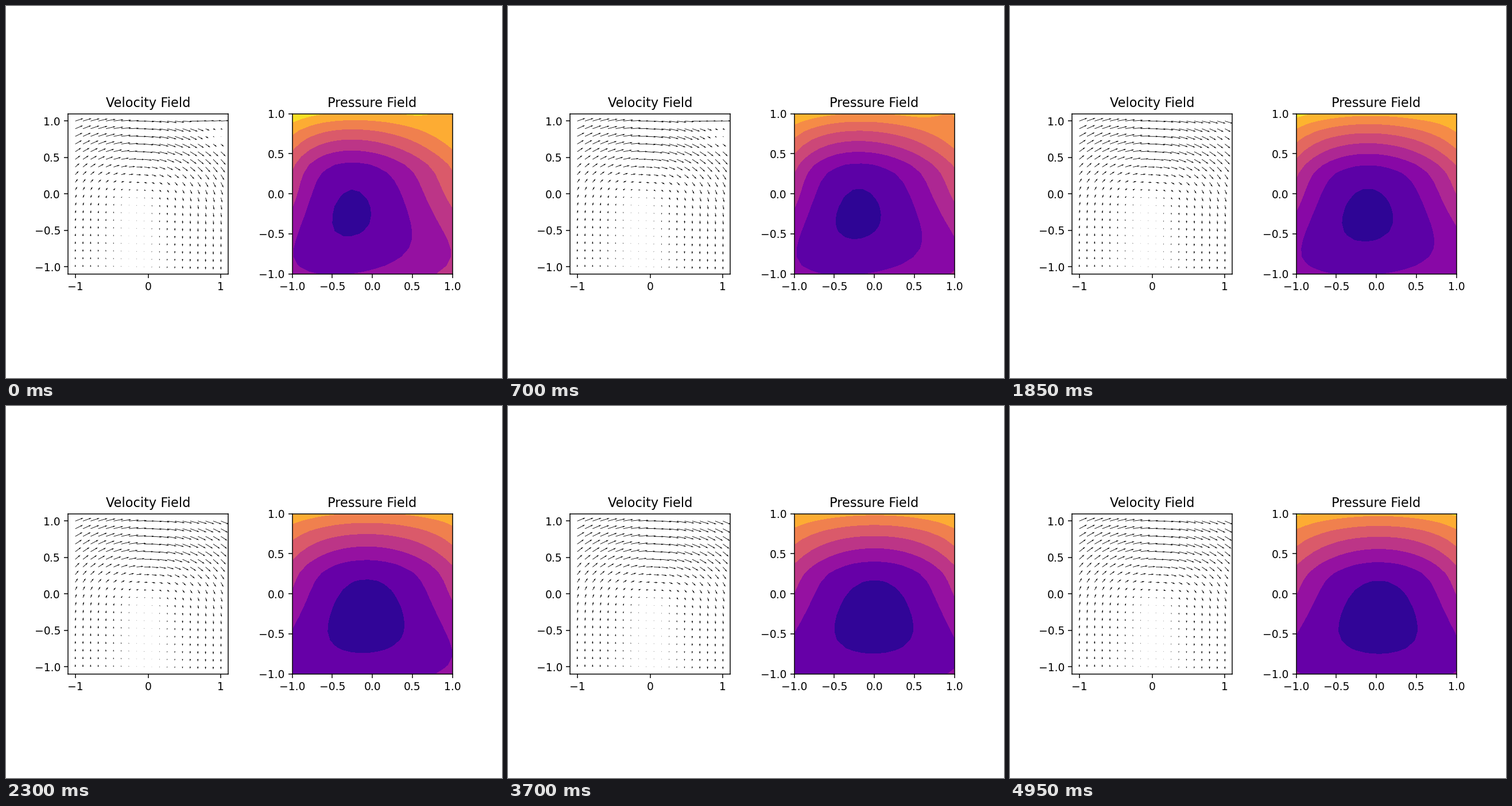
Animation, 864 px wide and 648 px high, one loop 5 s. Source, as a matplotlib script:

```python
import numpy as np
import matplotlib.pyplot as plt
from matplotlib.animation import FuncAnimation

FRAMES, INTERVAL = 100, 50
DURATION = 4.95
STEP_CHANGE = 2.2  # seconds; contour spacing widens here

axis = np.linspace(-1, 1, 20)
X, Y = np.meshgrid(axis, axis)


def rise(a, mid, width):
    """Smooth step from 0 to 1 around mid."""
    return 0.5 * (1 + np.tanh((a - mid) / width))


def bell(a, mid, width):
    return np.exp(-((a - mid) / width) ** 2)


def remaining(t):
    """Distance from the settled state, easing from 1 to 0."""
    return (1 - t / DURATION) ** 1.7


def corner_strength(t):
    """Disturbance in the upper right corner, gone by mid-loop."""
    return 1 - rise(t, 1.55, 0.7)


def offset_x(t):
    """Horizontal distance from the vortex centre, pinned at the walls."""
    centre = 0.03 - 0.21 * remaining(t)
    return X - centre * (1 - X ** 2)


def pressure(t):
    """Pressure in units of the first contour spacing."""
    r = remaining(t)
    y = Y - 0.06 * r * (1 + Y)
    bowl = (y + 0.28) ** 2 * (2.3 + 2 * rise(y, 0.31, 0.15))
    walls = offset_x(t) ** 2 * (0.3 + 2.65 * bell(Y, 0.15, 0.8))
    tilt = 0.5 * r * X * (1 - np.clip(Y, 0, 1) ** 4)
    dip = 1.15 * corner_strength(t) * bell(X, 1, 0.3) * bell(Y, 1, 0.12)
    return 0.73 + 0.2 * r ** 2 + bowl + walls + tilt - dip


def levels(p, t):
    step = 1 if t < STEP_CHANGE else 1.25
    count = max(8, int(np.ceil(p.max() / step)))
    return step * np.arange(count + 1)


def velocity(t):
    """Arrow components in pixels."""
    r, early = remaining(t), corner_strength(t)
    s = offset_x(t)

    middle = 18.6 * rise(Y, 0.22 + 0.06 * r, 0.33) - 0.6
    edge = 15.5 * rise(Y, 0.4, 0.55)
    u = middle + (edge - middle) * s ** 2
    swirl = 7.2 + 2.6 * Y - 4 * np.clip(Y, 0, 1) ** 4
    v = -s * (1.5 - 0.5 * s ** 2) * swirl * (1 + 0.2 * r * X)

    # Slow pocket under the lid; the lid row itself stays fast and level.
    lid = bell(Y, 1, 0.08)
    pocket = bell(X, 1, 0.33) * bell(Y, 0.84, 0.2)
    calm = 1 - early * pocket * (1 - lid)
    v *= 1 - 1.15 * early * lid * rise(X, 0.4, 0.2)
    return u * calm, v * calm


fig, (vel_ax, pre_ax) = plt.subplots(1, 2, figsize=(6.4, 4.8), dpi=135)
fig.subplots_adjust(left=0.125, right=0.9, bottom=0.11, top=0.88, wspace=0.4)
ticks = np.linspace(-1, 1, 5)


def style(ax, title, limit, xticks):
    ax.set(title=title, aspect="equal", xlim=(-limit, limit),
           ylim=(-limit, limit), xticks=xticks, yticks=ticks)


style(vel_ax, "Velocity Field", 1.1, [-1, 0, 1])
arrows = vel_ax.quiver(X, Y, *velocity(0), scale=279)


def draw(i):
    t = i * INTERVAL / 1000
    arrows.set_UVC(*velocity(t))
    p = pressure(t)
    pre_ax.clear()
    pre_ax.contourf(X, Y, p, levels=levels(p, t), cmap="plasma")
    style(pre_ax, "Pressure Field", 1, ticks)
    return []


anim = FuncAnimation(fig, draw, frames=FRAMES, interval=INTERVAL,
                     init_func=lambda: draw(0), repeat=True, repeat_delay=0)
plt.show()
```
